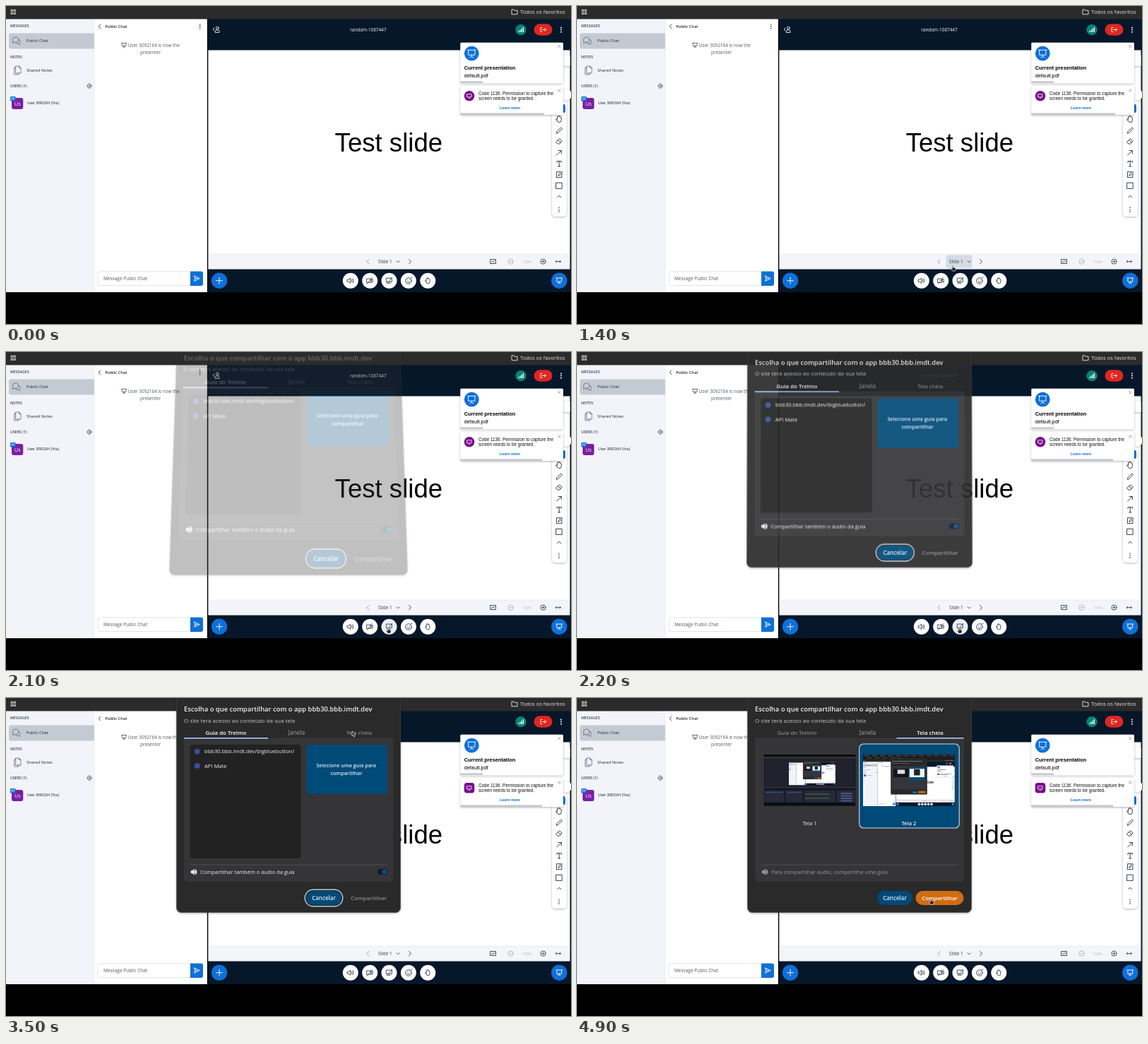
Animation of 800 by 450 pixels, one loop 5000 ms. Source, as an HTML page:

```html
<!DOCTYPE html>
<html lang="pt">
<head>
<meta charset="utf-8">
<title>Screen sharing</title>
<style>
html, body { margin: 0; width: 100%; height: 100%; overflow: hidden; background: #000; }
#stage { position: relative; width: 800px; height: 450px; overflow: hidden; }
svg { position: absolute; left: 0; top: 0; width: 800px; height: 450px; }
#dialog { transform-origin: 0 0; overflow: visible; }
text { font-family: "Open Sans", "Noto Sans", sans-serif; white-space: pre; }
.ar { font-family: "Liberation Sans", Arial, sans-serif; }
.b { font-weight: 600; }
.bb { font-weight: 700; }
.m { text-anchor: middle; }
.i { fill: none; stroke: #33404f; stroke-width: .9; stroke-linecap: round; stroke-linejoin: round; }
.w { stroke: #fff; }
</style>
</head>
<body>
<div id="stage">
<svg viewBox="0 0 800 450">
  <defs>
    <filter id="soft" x="-20%" y="-20%" width="140%" height="150%">
      <feDropShadow dx="0" dy="1" stdDeviation="1.8" flood-opacity=".3"/>
    </filter>
    <clipPath id="screen"><rect width="800" height="405"/></clipPath>
  </defs>
  <rect width="800" height="450"/>
  <g id="page" clip-path="url(#screen)">
    <rect width="800" height="406" fill="#06172a"/>
    <rect width="800" height="18.5" fill="#2b2b2b"/>
    <g fill="none" stroke="#d5d5d5" stroke-width="1">
      <path d="M7 5.2h2.4v2.2H7zM11 5.2h2.4v2.2H11zM7 9.3h2.4v2.2H7zM11 9.3h2.4v2.2H11z"/>
      <path d="M716 5h3l1 1.3h4v5.5h-8z"/>
    </g>
    <text x="728" y="11" font-size="7.5" fill="#e3e3e3">Todos os favoritos</text>

    <!-- sidebar -->
    <rect y="18.5" width="125" height="387" fill="#f3f4f9"/>
    <g font-size="5.25" fill="#34404f" class="b">
      <text x="6" y="30.3">MESSAGES</text><text x="6" y="73.5">NOTES</text><text x="6" y="115.3">USERS (1)</text>
    </g>
    <path d="M125 38.5H7a3 3 0 0 0-3 3v16a3 3 0 0 0 3 3h118z" fill="#c4cad3"/>
    <g font-size="5.85" fill="#1c2632">
      <text x="29" y="51.2">Public Chat</text><text x="29" y="93.4">Shared Notes</text>
    </g>
    <g class="i" style="stroke:#5c6978;stroke-width:.8">
      <path d="M11 51.5l-1.4 1.5.2-3a4.4 3.9 0 1 1 3.5 1.8zM17.5 47.5a3.3 3 0 0 1 1.4 5.3l.3 1.8-1.8-1.1a4 3 0 0 1-3.7-1.2"/>
      <path d="M14 85h4.5l2.5 2.5V95h-7zM18.5 85v2.5H21M14 87h-2.3v10H18v-2"/>
      <circle cx="118" cy="113.2" r="2.9"/><circle cx="118" cy="113.2" r="1.2"/>
      <path d="M118 109.7v.5M118 116.2v.5M114.5 113.2h.5M121 113.2h.5"/>
    </g>
    <rect x="8" y="130" width="16.3" height="16" rx="3" fill="#7b1fa2"/>
    <text x="16.3" y="140.8" font-size="7" fill="#fff" class="m">Us</text>
    <rect x="6" y="128" width="7.5" height="6.5" rx="1.2" fill="#0f70d7"/>
    <path class="i w" d="M8 129.8h3.6v2.2H8z" style="stroke-width:.6"/>
    <text x="30" y="139.2" font-size="5.1" class="ar" fill="#1c2632">User 3092164 (You)</text>

    <!-- chat -->
    <rect x="125" y="18.5" width="160" height="387" fill="#fff"/>
    <path d="M125 18.5v387" stroke="#e3e6ec" stroke-width=".6"/>
    <path d="M285.5 18.5v387" stroke="#000" stroke-width="1.3"/>
    <path class="i" d="M133.8 26l-2.6 2.9 2.6 2.9"/>
    <text x="140.3" y="31" font-size="5.75" fill="#1c2632" class="b">Public Chat</text>
    <g fill="#33404f"><circle cx="274.6" cy="26" r=".85"/><circle cx="274.6" cy="28.9" r=".85"/><circle cx="274.6" cy="31.8" r=".85"/></g>
    <path class="i" d="M163.5 52.5h7.2M164.2 52.5v4h5.8v-4M167.1 56.5v1.5M165.5 58.8l1.6-1 1.6 1" style="stroke-width:.7"/>
    <g font-size="6.4" fill="#4e5a66">
      <text x="172.7" y="57.6">User 3092164 is now the</text><text x="204.6" y="67.8" class="m">presenter</text>
    </g>
    <path d="M261 375.8H133a3 3 0 0 0-3 3v13.8a3 3 0 0 0 3 3h128z" fill="#fff" stroke="#d3d9e0" stroke-width=".7"/>
    <path d="M261 375.5h15a3 3 0 0 1 3 3v14.4a3 3 0 0 1-3 3h-15z" fill="#0f70d7"/>
    <path class="i w" d="M266.6 382l7.6 3.6-7.6 3.6 1.2-3.6zM268 385.6h3"/>
    <text x="138" y="388" font-size="6.5" fill="#4e5a66">Message Public Chat</text>

    <!-- header -->
    <path class="i w" d="M294.8 31l-1.6 2 1.6 2M296.2 37v-.8c0-1.6 1-2.3 2-2.3h1.8c1.2 0 2 .8 2 2.3v.8z"/>
    <circle cx="299.3" cy="31.2" r="1.9" class="i w"/>
    <text x="513" y="36" font-size="6.4" fill="#fff" class="m">random-1067447</text>
    <circle cx="729" cy="33.7" r="7.6" fill="#068475"/>
    <path d="M725.8 37v-1.6M728 37v-3.3M730.2 37v-5M732.4 37v-7" stroke="#fff" stroke-width="1.3"/>
    <rect x="747.5" y="25.2" width="26" height="16.6" rx="8.3" fill="#df2721"/>
    <path class="i w" d="M759 30.5h-2v6h2M759.5 33.5h5M762.7 31.6l2 1.9-2 1.9"/>
    <g fill="#fff"><circle cx="786" cy="30.4" r="1"/><circle cx="786" cy="33.6" r="1"/><circle cx="786" cy="36.8" r="1"/></g>

    <!-- slide -->
    <rect x="286.3" y="62.5" width="512.2" height="289" fill="#fff"/>
    <text x="465.6" y="206" font-size="36.6" class="ar">Test slide</text>
    <rect x="286.3" y="351" width="512.2" height="21.5" fill="#f4f5f9"/>
    <path d="M286.3 351h512.2" stroke="#e0e3e9" stroke-width=".6"/>
    <rect id="pill" x="522.5" y="352.5" width="37" height="18" rx="2" fill="#d4dbe4"/>
    <path class="i" d="M514 358.5l-3 3.2 3 3.2" style="stroke:#8d97a3"/>
    <path class="i" d="M570.5 358.5l3 3.2-3 3.2M553 360.8l2 2 2-2"/>
    <text x="527" y="364" font-size="6.45" fill="#33404f">Slide 1</text>
    <path class="i" d="M686 358.5h7.5v6H686zM687.6 363l1.6-2 1.2 1 1.6-2"/>
    <g class="i" style="stroke:#a9b1bb"><circle cx="714.5" cy="361.6" r="3.6"/><path d="M713 361.6h3"/></g>
    <text x="731" y="363.6" font-size="5.1" fill="#b5bbc4">100%</text>
    <g class="i"><circle cx="760.5" cy="361.6" r="3.6"/><path d="M759 361.6h3M760.5 360.1v3M778.3 361.6h7M779.6 360.2l-1.5 1.4 1.5 1.4M784 360.2l1.5 1.4-1.5 1.4"/></g>

    <!-- action bar -->
    <g fill="#fff">
      <circle cx="487.8" cy="388.7" r="11"/><circle cx="515.2" cy="388.7" r="11"/><circle id="share" cx="542.5" cy="388.7" r="11"/>
      <circle cx="569.9" cy="388.7" r="11"/><circle cx="597.3" cy="388.7" r="11"/>
    </g>
    <g fill="#0f70d7"><circle cx="302" cy="388.7" r="11.2"/><circle cx="783.3" cy="388.7" r="11.2"/></g>
    <g class="i">
      <path d="M483.5 387.2h1.7l2.5-2.1v7.2l-2.5-2.1h-1.7zM489.4 387.2q1 1.5 0 3M491 385.7q2 3 0 6"/>
      <path d="M511 386h5.7v5.4H511zM516.7 388l2.5-1.6v4.6l-2.5-1.6M511.3 393l7-8.5"/>
      <path d="M538.7 385h7.6v5.5h-7.6zM541 392.5h3M539 393l7.5-8.5"/>
      <circle cx="569.9" cy="388.9" r="4.3"/><path d="M567.9 390.2q2 2 4 0M568.3 387.5v.2M571.5 387.5v.2M573 385l2-1"/>
      <path d="M594.7 390.2l-1.2-1.6q.6-1 1.6.2v-3q.6-.9 1.2 0v-1q.7-.9 1.3 0v1q.7-.8 1.2 0v1q.7-.7 1.1.2v3.2q0 2.7-2.5 2.7-1.8 0-2.7-2.7z"/>
    </g>
    <path class="i w" d="M297.5 388.7h9M302 384.2v9M779 385h8.6M779.9 385v5.2h6.8V385M783.3 390.2v1.6M781.4 392.8l1.9-1.2 1.9 1.2"/>

    <!-- drawing tools -->
    <g filter="url(#soft)" fill="#fff">
      <path d="M798.5 70h-6a7.5 7.5 0 0 0 0 15h6zM793 117.5a8 8 0 0 1 0 16h-8v-16z"/>
      <rect x="773" y="134" width="20.7" height="164" rx="5"/>
    </g>
    <rect x="776" y="139" width="16" height="12" rx="2.5" fill="#0f70d7"/>
    <g class="i" style="stroke:#222b36">
      <path d="M780.7 163l-2.3-2.6q.9-1.2 2.1.3v-4q.7-.9 1.4 0v-1q.8-.9 1.5 0v1q.8-.9 1.5 0v1q.8-.7 1.4.2v3.4q0 3.5-3 3.5-1.4 0-2.6-1.8z"/>
      <path d="M779.5 180l.6-2.5 5.6-5.6 1.8 1.8-5.6 5.6zM778.8 192.3l4.7-4.5 3.7 3.3-3.5 4H781.500zM781.4 189.8l3.6 3.2M779.8 211l6.5-6.500M782 204.500h4.300v4.300M780 221.300v-1.600h6.400v1.600M783.200 219.700v7.200M781.700 226.900h3"/>
      <path d="M785 234.700h-5.600v8h7.500v-5M782 240l.5-1.800 4.200-4 1.300 1.300-4.200 4zM779 250.200h8.200v8.200H779zM780.700 270.700l2.500-2.500 2.500 2.500"/>
    </g>
    <g fill="#222b36"><circle cx="783" cy="285.300" r=".8"/><circle cx="783" cy="288.200" r=".8"/><circle cx="783" cy="291.100" r=".8"/></g>

    <!-- notifications -->
    <g filter="url(#soft)" fill="#fff">
      <rect x="643.300" y="51.800" width="145.700" height="57.500" rx="1.500"/><rect x="643.300" y="113.500" width="145.700" height="40.500" rx="1.500"/>
    </g>
    <circle cx="659.300" cy="67.200" r="10.400" fill="#0f70d7"/>
    <path class="i w" d="M653.600 62.300h11.400M654.700 62.300v7h9.200v-7M659.300 69.300v2M656.800 72.800l2.500-1.600 2.500 1.600"/>
    <text x="648.700" y="89.600" font-size="7.350" class="ar bb">Current presentation</text>
    <text x="648.700" y="101" font-size="7.300" class="ar">default.pdf</text>
    <rect x="643.300" y="106.500" width="32" height="2.300" fill="#bfc2cc"/>
    <rect id="icon" x="648.700" y="120" width="14.600" height="14.600" fill="#7b0d8c"/>
    <path class="i w" d="M653 124.800h6v4h-6zM655 130.300h2" style="stroke-width:.8"/>
    <g font-size="6.350" fill="#111">
      <text x="669" y="125.600" class="ar">Code 1136. Permission to capture the</text><text x="669" y="133.300" class="ar">screen needs to be granted.</text>
    </g>
    <text x="713.500" y="145.600" font-size="5.350" fill="#0f70d7" class="ar bb m">Learn more</text>
    <rect id="bar" x="643.300" y="151.500" height="2.300" fill="#bfc2cc"/>
    <path class="i" d="M781.500 55.300l3.600 3.600M785.100 55.300l-3.600 3.600M781.500 117.800l3.600 3.600M785.100 117.800l-3.600 3.600" style="stroke:#7c8590;stroke-width:.7"/>
  </g>
</svg>

<svg id="dialog" viewBox="0 0 800 450">
  <defs>
    <g id="shell">
      <path d="M241.500 -14H558.500V297a6.500 6.500 0 0 1-6.500 6.500H248a6.500 6.500 0 0 1-6.500-6.500z" fill="#292929" stroke="#454545" stroke-width=".6"/>
      <path d="M252 57.500H548V255a5 5 0 0 1-5 5H257a5 5 0 0 1-5-5z" fill="#343539"/>
      <path d="M260.500 236H540" stroke="#55565a" stroke-width=".7"/>
      <text x="252" y="19.400" font-size="9.400" fill="#f2f2f2" class="b">Escolha o que compartilhar com o app bbb30.bbb.imdt.dev</text>
      <text x="252" y="34.500" font-size="8" fill="#c9c9c9">O site terá acesso ao conteúdo da sua tela</text>
      <rect x="425" y="273" width="50" height="20" rx="10" fill="#004a77"/>
      <text x="450" y="285.900" font-size="8" fill="#d8ebff" class="b m">Cancelar</text>
    </g>
    <path id="speaker" d="M262 244.600h1.800l2.600-2.200v7.600l-2.600-2.200H262zM267.500 243.600q2.300 2.600 0 5.200M268.500 242q3.200 4.200 0 8.400"/>
    <clipPath id="row"><rect x="261" y="66" width="149" height="161"/></clipPath>
    <g id="tabPane">
      <rect x="260.500" y="66" width="157" height="161" rx="4" fill="#222"/>
      <g clip-path="url(#row)" font-size="7.600" fill="#f0f0f0">
        <text x="281" y="78.400">bbb30.bbb.imdt.dev/bigbluebutton/</text><text x="281" y="98.600">API Mate</text>
      </g>
      <g fill="#3a4f9a"><circle cx="270.700" cy="75.700" r="4"/><circle cx="270.700" cy="96" r="4"/></g>
      <rect x="425.500" y="66" width="114.500" height="70" rx="4" fill="#004a77"/>
      <g font-size="7.200" fill="#d8ebff"><text x="481.700" y="98" class="b m">Selecione uma guia para</text><text x="482" y="108.600" class="b m">compartilhar</text></g>
      <use href="#speaker" fill="#eee" stroke="#eee" stroke-width=".6"/>
      <text x="275" y="248.600" font-size="7.500" fill="#eee">Compartilhar também o áudio da guia</text>
      <rect x="526" y="242" width="14" height="8" rx="4" fill="#111e2c"/><circle cx="535.800" cy="246" r="3" fill="#00569a"/>
    </g>
    <g id="echoA"><use href="#shell"/><use href="#tabPane"/></g>
    <g id="echoB">
      <use href="#shell"/>
      <rect x="265" y="80" width="130" height="73" fill="#11131c"/><rect x="300" y="88" width="65" height="36" fill="#ddd"/>
      <rect x="400" y="65" width="141" height="119" rx="6" fill="#004a77"/><rect x="405" y="80" width="130" height="73" fill="#f2f2f2"/>
      <rect x="444" y="83" width="52" height="54" fill="#222"/><rect x="479" y="273" width="68" height="20" rx="10" fill="#c9680f"/>
    </g>
    <clipPath id="thumb"><rect width="130" height="73"/></clipPath>
  </defs>
  <g filter="url(#soft)"><use href="#shell"/></g>
  <g font-size="7.900">
    <text id="tabA" x="311.500" y="52.200" class="m">Guia do Trelmo</text>
    <text x="411.500" y="52.200" class="m" font-size="8.300" fill="#a2a2a2">Janela</text>
    <text id="tabC" x="500" y="52.200" class="m">Tela cheia</text>
  </g>
  <path d="M252 57.300H548" stroke="#48494c" stroke-width=".6"/>
  <rect id="line" y="56" height="1.600" fill="#a8c7fa"/>
  <use id="paneA" href="#tabPane"/>
  <g id="paneC">
    <rect id="card" x="399.700" y="65" width="141.500" height="119" rx="6" fill="#004a77" stroke="#c9ddf5" stroke-width="1.100"/>
    <g transform="translate(264.500 80)" clip-path="url(#thumb)">
      <rect width="130" height="73" fill="#171923"/>
      <rect width="130" height="3" fill="#0a0a0a"/><rect y="3" width="130" height="2.500" fill="#34353b"/>
      <rect x="1" y="6" width="127" height="39" fill="#20222e"/>
      <g transform="translate(35.500 10) scale(.0825)">
        <rect y="-24" width="800" height="24" fill="#222"/><use href="#page"/><use class="echoA" href="#echoA"/><use class="echoB" href="#echoB"/>
      </g>
      <path d="M0 46.500H130" stroke="#3d4050" stroke-width="1"/>
      <g fill="#252938"><rect x="1" y="51" width="28" height="17"/><rect x="31" y="51" width="24" height="17"/><rect x="57" y="51" width="44" height="17"/><rect x="103" y="51" width="26" height="17"/></g>
      <path d="M2 53.500h25M32 53.500h22" stroke="#35478b" stroke-width="1.500"/>
      <path d="M59 56h34M59 62h34" stroke="#5b8a4a" stroke-width=".8"/>
      <path d="M109 55h16M109 58.500h16M109 62h16M109 65.500h16" stroke="#4a5685" stroke-width="1.800"/>
      <path d="M0 70h130" stroke="#0c0d12" stroke-width="4"/>
    </g>
    <g transform="translate(405 80)" clip-path="url(#thumb)">
      <rect width="130" height="73" fill="#1d1d1d"/>
      <path d="M2 1.500h126M5 4.800h48" stroke="#6b6b6b" stroke-width=".7" stroke-dasharray="7 4"/>
      <g transform="translate(0 7.200) scale(.1625)"><use href="#page"/><use class="echoA" href="#echoA"/><use class="echoB" href="#echoB"/></g>
    </g>
    <g font-size="7.500" fill="#f2f2f2"><text x="329.500" y="180" class="m">Tela 1</text><text id="name2" x="470" y="180" class="m">Tela 2</text></g>
    <use href="#speaker" fill="#9b9b9b" stroke="#9b9b9b" stroke-width=".6"/>
    <text x="275" y="248.600" font-size="7.500" fill="#9b9b9b">Para compartilhar áudio, compartilhe uma guia</text>
  </g>
  <rect id="ring" x="423.200" y="271.200" width="53.600" height="23.600" rx="11.800" fill="none" stroke="#cfe5ff" stroke-width="1.200"/>
  <rect id="ok" x="479.500" y="273" width="68" height="20" rx="10" fill="#d06c12"/>
  <text id="okText" x="513.500" y="285.900" font-size="7.900" class="b m">Compartilhar</text>
</svg>

<svg viewBox="0 0 800 450">
  <g id="cursor" stroke="#fff" stroke-width=".6" fill="#222">
    <path id="arrow" d="M0 0v7l1.600-1.400 1.100 2.500 1.200-.5-1.100-2.500 2.100-.2z"/>
    <path id="hand" d="M-.7.300q.7-.8 1.400 0v2.500l2.800.7q.8.400.6 1.500l-.5 3H-.7L-2.700 5q0-1.300 1.200-.7l.8.700z"/>
  </g>
</svg>
</div>
<script>
const LOOP = 5000, STEP = 100;
const $ = id => document.getElementById(id);
const show = (el, on) => { el.style.display = on ? "" : "none"; };
const set = (id, name, value) => $(id).setAttribute(name, value);
const clamp = v => Math.min(1, Math.max(0, v));

// time, x, y of the pointer
const path = [
  [1000, 0, 300], [1400, 532, 367], [1700, 541, 390], [2200, 541, 390],
  [2600, 498, 176], [3000, 498, 176], [3400, 490, 47], [3700, 490, 47],
  [3900, 486, 98], [4200, 486, 98], [4600, 501, 284]
];

function pointer(t) {
  const n = path.findIndex(p => p[0] > t);
  if (n < 1) return path[n ? path.length - 1 : 0].slice(1);
  const [a, b] = [path[n - 1], path[n]];
  const u = (t - a[0]) / (b[0] - a[0]), e = u * u * (3 - 2 * u);
  return [a[1] + (b[1] - a[1]) * e, a[2] + (b[2] - a[2]) * e];
}

// The dialog swings in, hinged near the top with perspective.
function swing(p) {
  const q = (1 - p) / 0.7, k = 0.00021 * q, c = 1 + 0.0034 * q;
  const m = [1, 0, 0, 0, -400 * k, 1, 0, -k, 0, 0, 1, 0, 400 * (c - 1), -7 * q, 0, c];
  $("dialog").style.transform = p < 1 ? `matrix3d(${m.map(v => v.toFixed(7))})` : "none";
  $("dialog").style.opacity = p;
}

function render(t) {
  const open = t >= 2100, full = t >= 3700, picked = t >= 4200;
  show($("dialog"), open);
  if (open) swing(clamp(0.3 + (t - 2100) / 160));

  show($("paneA"), !full);
  show($("paneC"), full);
  set("tabA", "fill", full ? "#a2a2a2" : "#fff");
  set("tabC", "fill", full ? "#fff" : "#a2a2a2");
  $("tabA").style.fontWeight = full ? 400 : 600;
  $("tabC").style.fontWeight = full ? 600 : 400;
  set("line", "x", full ? 452.5 : 252);
  set("line", "width", full ? 95 : 119);

  show($("card"), picked);
  show($("ring"), !picked);
  show($("ok"), picked);
  set("okText", "fill", picked ? "#fff" : "#8b8b8b");
  $("name2").style.fontWeight = picked ? 600 : 400;
  document.querySelectorAll("use.echoA").forEach(el => show(el, !picked));
  document.querySelectorAll("use.echoB").forEach(el => show(el, picked));

  const [x, y] = pointer(t), hand = t < 2300 || t >= 4500;
  show($("cursor"), t >= 1000);
  set("cursor", "transform", `translate(${x} ${y})`);
  show($("hand"), hand);
  show($("arrow"), !hand);
  show($("pill"), t >= 1400 && x > 522 && x < 560 && y > 352 && y < 371);
  set("share", "fill", t >= 1600 && t < 2300 ? "#eceff2" : "#fff");
  set("bar", "width", t < 2000 ? 118.700 : 116);
  set("icon", "rx", t < 2500 ? 7.3 : 4);
}

function tick(now) {
  render(Math.floor(now % LOOP / STEP) * STEP);
  requestAnimationFrame(tick);
}
render(0);
requestAnimationFrame(tick);
</script>
</body>
</html>
```
